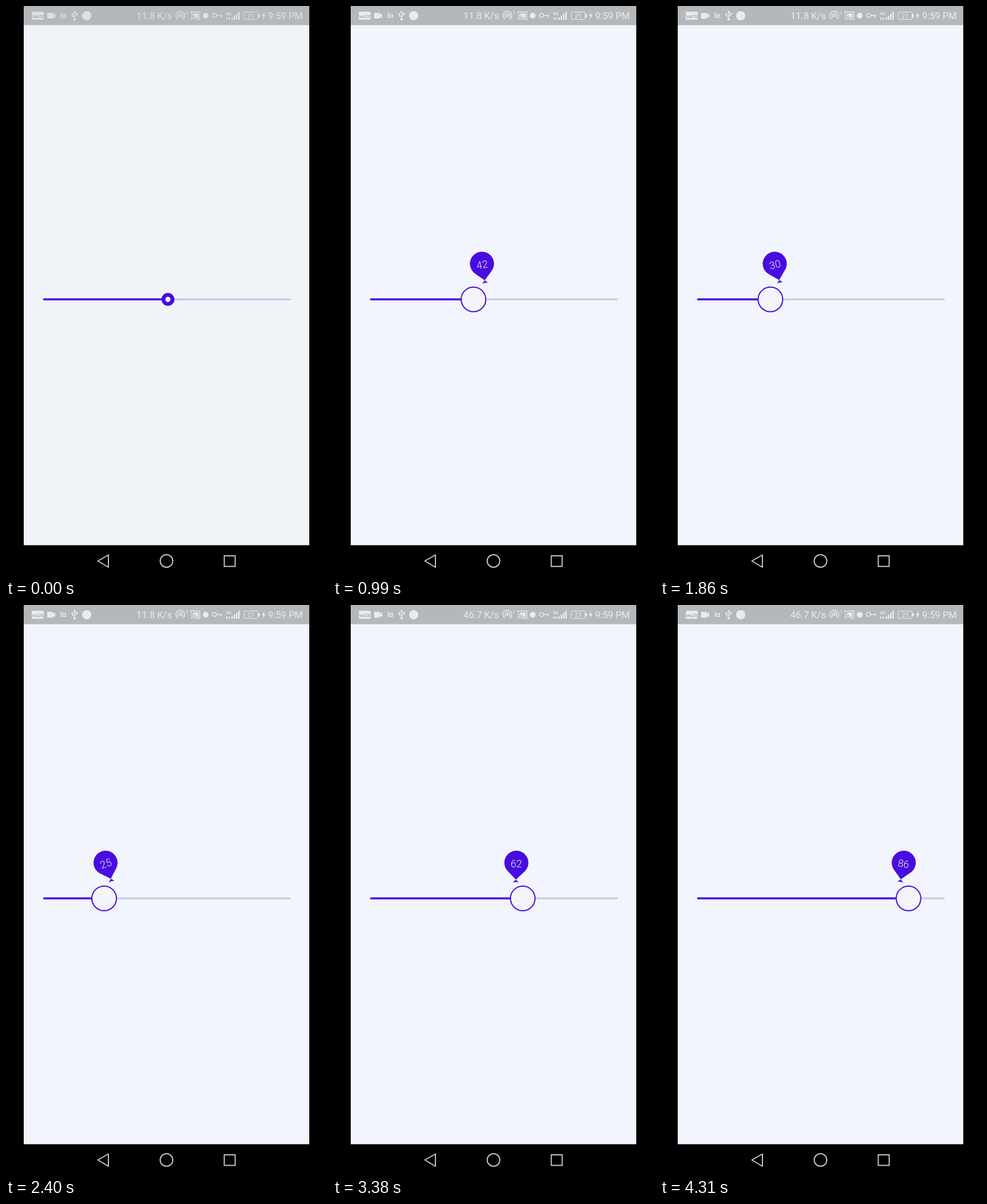
Recreate the animation shown at these times as an HTML page. Size 561 px wide and 997 px high, loop 4370 ms.

```html
<!DOCTYPE html>
<html lang="en">
<head>
<meta charset="utf-8">
<title>Balloon slider</title>
<style>
  html, body { margin: 0; width: 100%; height: 100%; overflow: hidden; background: #000; }
  svg { display: block; width: 100%; height: 100%; }
  text { font-family: Roboto, sans-serif; }
</style>
</head>
<body>
<svg viewBox="0 0 561 997">
  <rect width="561" height="997" fill="#000"/>
  <rect id="page" x="31" y="33" width="499" height="908.5"/>
  <rect x="31" width="499" height="33.5" fill="#b4b8bb"/>

  <g id="status" fill="#e9ecee" font-size="16.5">
    <rect x="45" y="10" width="21" height="14" rx="2"/>
    <text x="55.5" y="20.5" font-size="8" font-weight="700" fill="#a9adb0" text-anchor="middle" letter-spacing="-.5">VoLTE</text>
    <path d="M72 12h10v3.500l4-3v9l-4-3v3.500h-10z"/>
    <path d="M96.500 11v10M99.500 15h4.500v5h-4.500z" fill="none" stroke="#e9ecee" stroke-width="1.600"/>
    <g fill="none" stroke="#e9ecee" stroke-width="1.400">
      <path d="M120 11v12M120 20l-4-2.500v-3M120 18l4-2.500v-2.500"/>
    </g>
    <path d="M120 8l2.500 4h-5zM118 22h4v3h-4zM114.500 13h3v3h-3zM122.500 12h3v3h-3z"/>
    <circle cx="141" cy="17" r="8"/>

    <text id="speed" x="228" y="23"></text>
    <g fill="none" stroke="#e9ecee" stroke-width="1.500">
      <path d="M300.500 23a7.700 7.700 0 1 1 8.500 0M302.500 20a4 4 0 1 1 4.500 0"/>
      <path d="M323 13v-2.500h15.500v13h-6M323 15.500a8 8 0 0 1 8 8M323 19a4.500 4.500 0 0 1 4.500 4.500"/>
      <circle cx="364.500" cy="16.500" r="3.500"/>
      <path d="M368 16.500h10M375.500 16.500v4"/>
      <rect x="416.500" y="10.500" width="24" height="13" rx="2" stroke-width="1"/>
    </g>
    <circle cx="304.800" cy="17" r="1.800"/>
    <text x="314" y="16" font-size="9">1</text>
    <path d="M323 22h2v2h-2zM327 13h9v8h-3.500q-1-4.500-5.500-6z"/>
    <circle cx="349" cy="17" r="5"/>
    <text x="384" y="16" font-size="8" font-weight="700">4G</text>
    <path d="M385 20h2v4h-2zM389 20h2v4h-2zM394 20h2.500v4h-2.500zM398 17h2.500v7h-2.500zM402 13.500h2.500v10.500h-2.500zM406 10h2.500v14h-2.500zM441 14h2.500v6h-2.500z"/>
    <text x="428.500" y="21" font-size="11" text-anchor="middle">21</text>
    <path d="M451.500 10l-4 8h2.500l-1 6 4.500-8.500h-2.800z"/>
    <text x="458" y="23">9:59 PM</text>
  </g>

  <g fill="none" stroke="#c4c4c4" stroke-width="2">
    <path d="M160.500 969l18.500-10.500v21.500z" stroke-linejoin="round"/>
    <circle cx="280.500" cy="969" r="11"/>
    <rect x="381.500" y="960" width="19" height="18.500"/>
  </g>

  <g stroke-width="3.600" stroke-linecap="round">
    <path id="track" d="M66.500 512.300H496"/>
    <path id="filled" stroke="#480ce0"/>
  </g>
  <circle id="knob" cy="512.300" stroke="#480ce0"/>

  <g id="balloon" fill="#480ce0">
    <path d="M0 29.500L-14.700 15A21 21 0 1 1 14.700 15Z"/>
    <path d="M0 29.500L5.200 34.500Q0 33 -5.200 34.500Z"/>
    <text id="value" y="8" font-size="18" font-weight="300" fill="#f4f0ff" text-anchor="middle"></text>
  </g>
</svg>

<script>
  const LOOP = 4370;
  const el = id => document.getElementById(id);
  const set = (id, attrs) => {
    for (const name in attrs) el(id).setAttribute(name, attrs[name]);
  };

  // Monotone cubic curve through [time, value] points.
  function curve(points) {
    const slopes = points.slice(1).map(([t, v], i) => (v - points[i][1]) / (t - points[i][0]));
    const tangents = points.map((_, i) => {
      const a = slopes[i - 1], b = slopes[i];
      if (a === undefined) return b;
      if (b === undefined) return a;
      return a * b > 0 ? 2 * a * b / (a + b) : 0;
    });
    return t => {
      if (t <= points[0][0]) return points[0][1];
      const i = points.findIndex(p => p[0] >= t);
      if (i < 0) return points[points.length - 1][1];
      const [t0, v0] = points[i - 1], [t1, v1] = points[i];
      const h = t1 - t0, u = (t - t0) / h, w = 1 - u;
      return v0 * w * w * (1 + 2 * u) + v1 * u * u * (3 - 2 * u)
        + h * u * w * (tangents[i - 1] * w - tangents[i] * u);
    };
  }

  const knobX = curve([[300, 283], [560, 270], [1430, 220.5], [2400, 171.5],
    [2900, 262], [3800, 389], [3870, 399], [4310, 434.3]]);
  const headX = curve([[300, 283], [560, 279.700], [1430, 232.5], [2400, 174],
    [2900, 254.7], [3800, 376.7], [3870, 387], [4310, 426]]);
  const lean = curve([[300, 0], [560, -6], [1430, -12], [2400, -18],
    [2900, -7], [3800, 7], [4310, 10]]);
  const headY = curve([[300, 512], [560, 448], [650, 450]]);
  const size = curve([[300, 0], [560, 0.91], [650, 1]]);
  const press = curve([[180, 0], [280, 0.6], [400, 1]]);

  function draw(t) {
    const idle = t < 70;
    const x = knobX(t), p = press(t);
    const outer = 11.3 + 11.2 * p, ring = 6.8 - 4.8 * p;
    const pageColor = idle ? "#f0f4f8" : "#f2f5fd";

    set("page", { fill: pageColor });
    set("status", { opacity: idle ? 0.8 : 1 });
    set("track", { stroke: idle ? "#cdc6e8" : "#c8d1e8" });
    set("filled", { d: `M66.5 512.3H${x}` });
    set("knob", { cx: x, r: outer - ring / 2, "stroke-width": ring, fill: "#f4f5fb" });
    set("balloon", {
      transform: `translate(${headX(t)} ${headY(t)}) rotate(${lean(t)}) scale(${size(t)})`,
      visibility: t > 300 ? "visible" : "hidden"
    });
    el("value").textContent = Math.round((x - 63) / 4.33);
    el("speed").textContent = t < 2650 ? "11.8 K/s" : "46.7 K/s";
  }

  const start = performance.now();
  function tick() {
    draw((performance.now() - start) % LOOP);
    requestAnimationFrame(tick);
  }
  tick();
</script>
</body>
</html>
```
